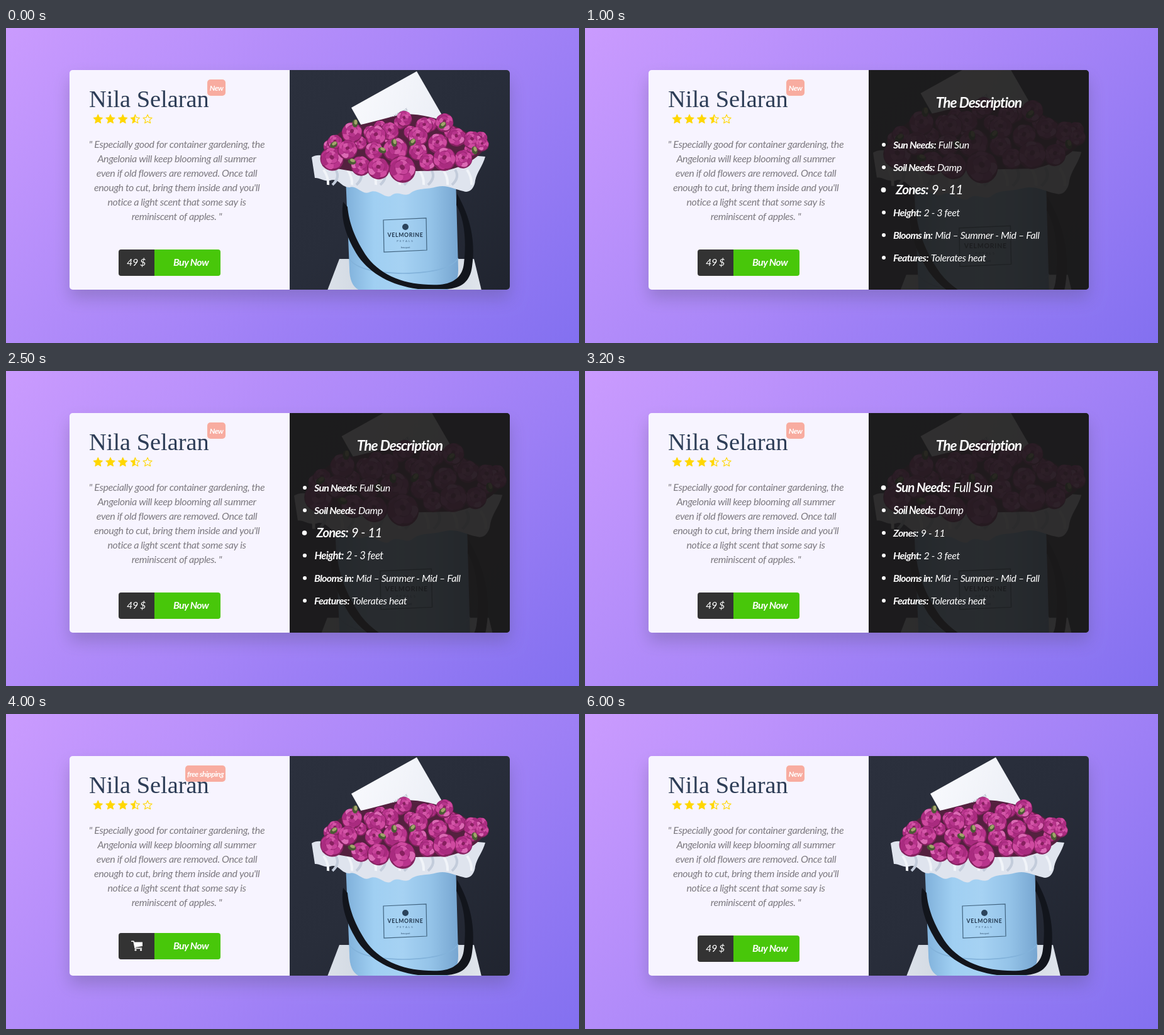
These frames come from a looping animation (911x502 px, 7100 ms). An HTML page with a canvas:

```html
<!DOCTYPE html>
<html lang="en">
<head>
<meta charset="utf-8">
<title>Product card</title>
<style>
  html, body { margin: 0; width: 100%; height: 100%; overflow: hidden; background: #a685f8; }
  canvas { display: block; }
</style>
</head>
<body>
<canvas id="stage" width="911" height="502"></canvas>
<script>
const ctx = document.getElementById('stage').getContext('2d');
const LOOP = 7100, STEP = 100;
const CARD = { x: 101, y: 67, w: 700, h: 350 };
const HALF = 350, MID = 451;
const SANS = 'Lato, "Open Sans", sans-serif';
const SERIF = '"Liberation Serif", serif';
const SHOP = 'VELMORINE';

const PANEL_IN = 560, PANEL_OUT = 3432;
const HOVERS = [ // start, end, row
  [680, 1020, 2], [1020, 1180, 1], [1180, 1740, 0], [1740, 1880, 1], [1880, 2020, 2],
  [2020, 2320, 3], [2320, 2650, 2], [2650, 3000, 1], [3000, 3432, 0]
];
const ROWS = [
  ['Sun Needs:', 'Full Sun'], ['Soil Needs:', 'Damp'], ['Zones:', '9 - 11'],
  ['Height:', '2 - 3 feet'], ['Blooms in:', 'Mid – Summer - Mid – Fall'], ['Features:', 'Tolerates heat']
];
const QUOTE = [
  '" Especially good for container gardening, the', 'Angelonia will keep blooming all summer',
  'even if old flowers are removed. Once tall', "enough to cut, bring them inside and you'll",
  'notice a light scent that some say is', 'reminiscent of apples. "'
];
const ROSES = [ // x, y, radius
  [523, 181, 12], [550, 166, 17], [741, 178, 15], [757, 185, 11], [633, 144, 13], [665, 155, 14],
  [697, 150, 15], [610, 164, 15], [588, 171, 17], [716, 173, 15], [655, 172, 16], [686, 183, 16],
  [518, 208, 19], [543, 193, 16], [585, 195, 15], [655, 196, 15], [727, 208, 15], [564, 219, 16],
  [619, 193, 20], [670, 213, 14], [592, 223, 18], [697, 208, 19], [630, 224, 22]
];
const BUDS = [[555, 152], [521, 186], [598, 195], [617, 183], [694, 155], [550, 213], [745, 195], [646, 182]];

const clamp = v => Math.max(0, Math.min(1, v));

// cubic-bezier(.25, .1, .25, 1)
function ease(x) {
  x = clamp(x);
  let lo = 0, hi = 1;
  const at = (u, a, b) => 3 * u * (1 - u) ** 2 * a + 3 * u * u * (1 - u) * b + u ** 3;
  for (let i = 0; i < 20; i++) {
    const m = (lo + hi) / 2;
    if (at(m, .25, .25) < x) lo = m; else hi = m;
  }
  return at(lo, .1, 1);
}

function hover(t, start, end, time) {
  const rise = ease((Math.min(t, end) - start) / time);
  return rise * (1 - ease((t - end) / time));
}

function group(draw) { ctx.save(); draw(); ctx.restore(); }

function text(str, x, y, size, color, { bold = false, italic = true, align = 'left', family = SANS, spacing } = {}) {
  ctx.font = `${italic ? 'italic' : 'normal'} ${bold ? 700 : 400} ${size}px ${family}`;
  ctx.letterSpacing = (spacing ?? size * (bold ? -.045 : -.025)) + 'px';
  ctx.textAlign = align;
  ctx.fillStyle = color;
  ctx.fillText(str, x, y);
  return ctx.measureText(str).width;
}

function box(x, y, w, h, r, color) {
  ctx.beginPath();
  ctx.roundRect(x, y, w, h, r);
  ctx.fillStyle = color;
  ctx.fill();
}

function disc(x, y, rx, ry, color, turn = 0) {
  ctx.beginPath();
  ctx.ellipse(x, y, rx, ry, turn, 0, Math.PI * 2);
  ctx.fillStyle = color;
  ctx.fill();
}

function shape(path, color) {
  ctx.fillStyle = color;
  ctx.fill(new Path2D(path));
}

function line(path, color, width) {
  ctx.strokeStyle = color;
  ctx.lineWidth = width;
  ctx.stroke(new Path2D(path));
}

function gradient(x0, y0, x1, y1, ...colors) {
  const g = ctx.createLinearGradient(x0, y0, x1, y1);
  colors.forEach((c, i) => g.addColorStop(i / (colors.length - 1), c));
  return g;
}

function backdrop() {
  ctx.fillStyle = gradient(102, -102, 809, 604, '#ca9bfe', '#a986f8', '#8370f0');
  ctx.fillRect(0, 0, 911, 502);
  group(() => {
    ctx.shadowColor = 'rgba(80, 75, 110, .3)';
    ctx.shadowBlur = 26;
    ctx.shadowOffsetY = 14;
    box(CARD.x, CARD.y, CARD.w, CARD.h, 5, '#f7f4ff');
  });
}

function star(x, y, fill) {
  const path = new Path2D();
  for (let i = 0; i < 10; i++) {
    const r = i % 2 ? 3.5 : 7.5, a = i * Math.PI / 5 - Math.PI / 2;
    path.lineTo(x + r * Math.cos(a), y + r * Math.sin(a));
  }
  path.closePath();
  group(() => {
    ctx.strokeStyle = ctx.fillStyle = '#ffd700';
    ctx.lineWidth = 1.1;
    ctx.lineJoin = 'round';
    ctx.stroke(path);
    ctx.beginPath();
    ctx.rect(x - 9, y - 9, 18 * fill, 18);
    ctx.clip();
    ctx.fill(path);
  });
}

function badge(free) {
  const left = free ? 285 : 320;
  box(left, 82, 349 - left, 26, 5, '#f8aca0');
  text(free ? 'free shipping' : 'New', (left + 349) / 2, 99.5, 12, '#fff', { bold: true, align: 'center' });
}

function cart(x, y) {
  group(() => {
    ctx.translate(x, y);
    shape('M4 2.5H18V9L6 11Z', '#fff');
    ctx.lineJoin = ctx.lineCap = 'round';
    line('M.7 1.2H4L6.3 12.4H16.5', '#fff', 1.6);
    disc(7, 15, 1.6, 1.6, '#fff');
    disc(15.6, 15, 1.6, 1.6, '#fff');
  });
}

function button(k) {
  group(() => {
    ctx.translate(179, 353 - 4 * k);
    ctx.beginPath();
    ctx.roundRect(0, 0, 162, 42, 4);
    ctx.clip();
    ctx.fillStyle = '#333';
    ctx.fillRect(0, 0, 58, 42);
    text('49 $', 13 - 63 * k, 26, 16, '#fff');
    cart(20 - 57 * (1 - k), 12);
    ctx.fillStyle = '#48c70a';
    ctx.fillRect(57, 0, 105, 42);
    text('Buy Now', 87, 26, 16, '#fff', { bold: true });
  });
}

function details(t) {
  text('Nila Selaran', 132, 126, 38.4, '#2d3d56', { italic: false, family: SERIF, spacing: 0 });
  [1, 1, 1, .5, 0].forEach((fill, i) => star(146.3 + 19.7 * i, 145.5, fill));
  QUOTE.forEach((s, i) => text(s, 271.5, 191 + 23 * i, 16, '#7d7a80', { align: 'center' }));
  badge(t >= 3560 && t < 5000);
  button(hover(t, 3680, 5720, 280));
}

function ring(x, y, r, count, turn, colors) {
  for (let j = 0; j < count; j++) {
    const a = turn + j * Math.PI * 2 / count;
    disc(x + Math.cos(a) * r * .52, y + Math.sin(a) * r * .5, r * .56, r * .36,
      colors[j % colors.length], a + Math.PI / 2 + .3);
  }
}

function rose([x, y, r], i) {
  const turn = i * 1.9;
  disc(x, y + 1, r, r * .95, '#84215f', turn);
  ring(x, y, r, 7, turn, ['#b8348c', '#cf4aa0', '#a92b7f', '#dc69b4']);
  disc(x, y - r * .1, r * .58, r * .54, '#9b2573', turn);
  ring(x, y - r * .1, r * .6, 5, turn + 1, ['#d457a8', '#b6348b', '#c7439a']);
  disc(x, y - r * .1, r * .2, r * .17, '#87205f', turn);
}

function bouquet() {
  shape('M486 206C500 196 520 212 545 206L740 203L762 205C758 220 749 229 746 243C745 255 737 264 727 260C713 257 701 249 685 253C668 258 654 254 642 264C632 270 623 257 611 268C600 271 591 255 577 262C565 266 558 250 546 254C532 254 529 238 515 243C505 245 499 238 491 239Z', '#dfe4ee');
  for (let i = 0; i < 13; i++) {
    const x = 505 + i * 19;
    line(`M${x} 226Q${x + 8} 238 ${x + (i % 2 ? -5 : 7)} 250`, i % 2 ? '#c3ccdb' : '#f1f4f9', 4);
  }
  shape('M503 220C502 195 520 168 548 157C580 152 605 142 635 137C690 138 722 160 763 184C764 198 734 220 700 227L560 230Z', '#54213f');
  for (let i = 0; i < 16; i++) { // smaller blooms in the gaps
    const u = i / 15;
    rose([515 + 240 * u, 188 - 27 * Math.sin(Math.PI * u) + 13 * Math.sin(i * 2.4), 11], i + 4);
  }
  ROSES.forEach(rose);
  BUDS.forEach(([x, y], i) => {
    disc(x, y, 4.5, 6.5, '#4c5a35', i);
    disc(x + 1, y - 2, 2.5, 4, '#a2a56a', i);
  });
}

function giftBox() {
  shape('M530 368H744L756 418H511Z', gradient(511, 0, 756, 0, '#dbe1e9', '#c6cfda', '#e0e5ec'));
  shape('M540 238H715L719 383Q720 417 690 420H570Q546 417 546 383Z',
    gradient(540, 0, 720, 0, '#7fb0da', '#a0cff2', '#a6d2f3', '#94c3e8', '#76a5d0'));
  line('M546 368Q560 390 632 391Q704 390 719 367', '#82b2da', 1.5);
  shape('M536 277C531 305 542 336 560 364C580 392 612 410 655 416H700C724 415 738 404 741 380C747 340 738 300 717 264L716 282C730 306 732 345 728 375C726 396 712 407 690 409C640 411 600 398 575 366C554 336 545 308 543 285Z', '#12151c');
  ctx.strokeStyle = '#40637f';
  ctx.lineWidth = 1.2;
  ctx.beginPath();
  ctx.moveTo(600, 306); ctx.lineTo(668, 303); ctx.lineTo(669, 354); ctx.lineTo(601, 357);
  ctx.closePath();
  ctx.stroke();
  disc(635, 317, 5, 5, '#2b435c');
  const center = { italic: false, align: 'center' };
  text(SHOP, 635, 333, 8.7, '#20364d', { ...center, bold: true, spacing: .7 });
  text('PETALS', 635, 341, 4.5, '#3f6080', { ...center, spacing: 2 });
  text('bouquet', 635, 351, 4.5, '#3f6080', { align: 'center' });
}

function photo(scale) {
  group(() => {
    ctx.translate(626, 242);
    ctx.scale(scale, scale);
    ctx.translate(-626, -242);
    ctx.fillStyle = gradient(451, 67, 801, 417, '#2b303d', '#282d3a', '#20242f');
    ctx.fillRect(MID, CARD.y, HALF, HALF);
    giftBox();
    shape('M549 127L653 69L695 142L590 200Z', gradient(560, 100, 680, 160, '#f8f9fd', '#eceff6'));
    group(() => {
      ctx.translate(624, 139);
      ctx.rotate(-.5);
      text(SHOP, 0, 0, 5.4, '#8791a4', { italic: false, align: 'center', spacing: .5 });
    });
    bouquet();
  });
}

function infoRow([label, value], i, k) {
  group(() => {
    ctx.translate(490 + 4 * k, 186 + 36 * i);
    ctx.scale(1 + .3 * k, 1 + .3 * k);
    disc(-15, 0, 3, 3, '#fff');
    const w = text(label, 0, 5.5, 16, '#fff', { bold: true });
    text(value, w + 4, 5.5, 16, '#fff');
  });
}

function infoPanel(t, shown) {
  if (!shown) return;
  group(() => {
    ctx.translate(-HALF * (1 - shown), 0);
    ctx.fillStyle = 'rgba(27, 26, 26, .9)';
    ctx.fillRect(MID, CARD.y, HALF, HALF);
    text('The Description', 626, 127, 22.8, '#fff', { bold: true, align: 'center' });
    ROWS.forEach((row, i) => {
      const grow = HOVERS.filter(h => h[2] === i).map(([a, b]) => hover(t, a, b, 300));
      infoRow(row, i, Math.max(0, ...grow));
    });
  });
}

function draw(now) {
  const t = Math.floor(now % LOOP / STEP) * STEP;
  const zoom = t < PANEL_OUT ? 1 + .2 * ease((t - PANEL_IN) / 300) : 1;
  backdrop();
  details(t);
  group(() => {
    ctx.beginPath();
    ctx.roundRect(MID, CARD.y, HALF, HALF, [0, 5, 5, 0]);
    ctx.clip();
    photo(zoom);
    infoPanel(t, hover(t, PANEL_IN, PANEL_OUT, 400));
  });
}

function tick() {
  draw(performance.now());
  requestAnimationFrame(tick);
}
tick();
</script>
</body>
</html>
```
